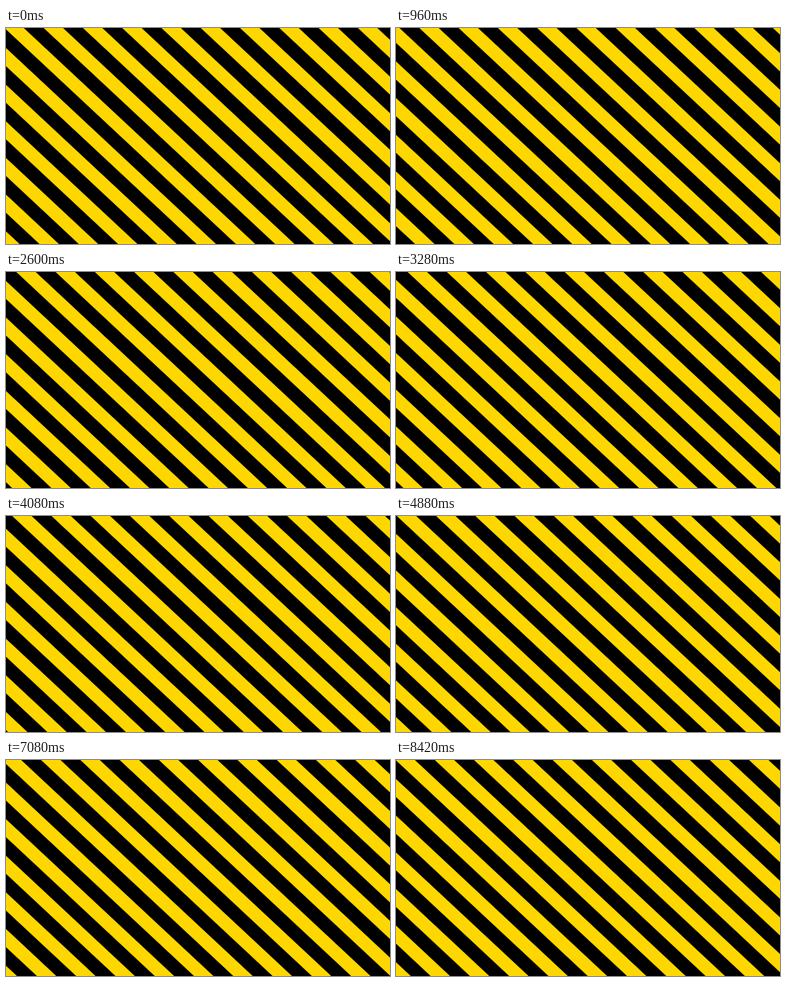
Recreate the animation shown at these times as an HTML page with a canvas. Size 480 by 270 pixels, loop 8440 ms.

```html
<!DOCTYPE html>
<html lang="en">
<head>
<meta charset="utf-8">
<title>Hazard stripes</title>
<style>
html, body { margin: 0; width: 100%; height: 100%; overflow: hidden; background: #000; }
canvas { display: block; width: 480px; height: 270px; }
</style>
</head>
<body>
<canvas id="stage" width="480" height="270"></canvas>
<script>
const W = 480, H = 270;
const LOOP = 8440, STEP = 20, CYCLES = 12;
const PERIOD = 49.1;   // horizontal distance between stripes
const BAND = 24.2;     // horizontal width of a yellow stripe
const LEAN = 289.4;    // sideways run from top to bottom
const START = -2;      // left edge of the first stripe at time zero

const ctx = document.getElementById('stage').getContext('2d');

function draw(ms) {
  const t = Math.floor((ms % LOOP) / STEP) * STEP;
  const shift = (t / LOOP * CYCLES) % 1 * PERIOD;

  ctx.fillStyle = '#000';
  ctx.fillRect(0, 0, W, H);
  ctx.fillStyle = '#ffd700';
  ctx.beginPath();
  for (let x = START - shift - 7 * PERIOD; x < W; x += PERIOD) {
    ctx.moveTo(x, 0);
    ctx.lineTo(x + BAND, 0);
    ctx.lineTo(x + BAND + LEAN, H);
    ctx.lineTo(x + LEAN, H);
    ctx.closePath();
  }
  ctx.fill();
}

const begin = performance.now();
function tick() {
  draw(performance.now() - begin);
  requestAnimationFrame(tick);
}
tick();
</script>
</body>
</html>
```
